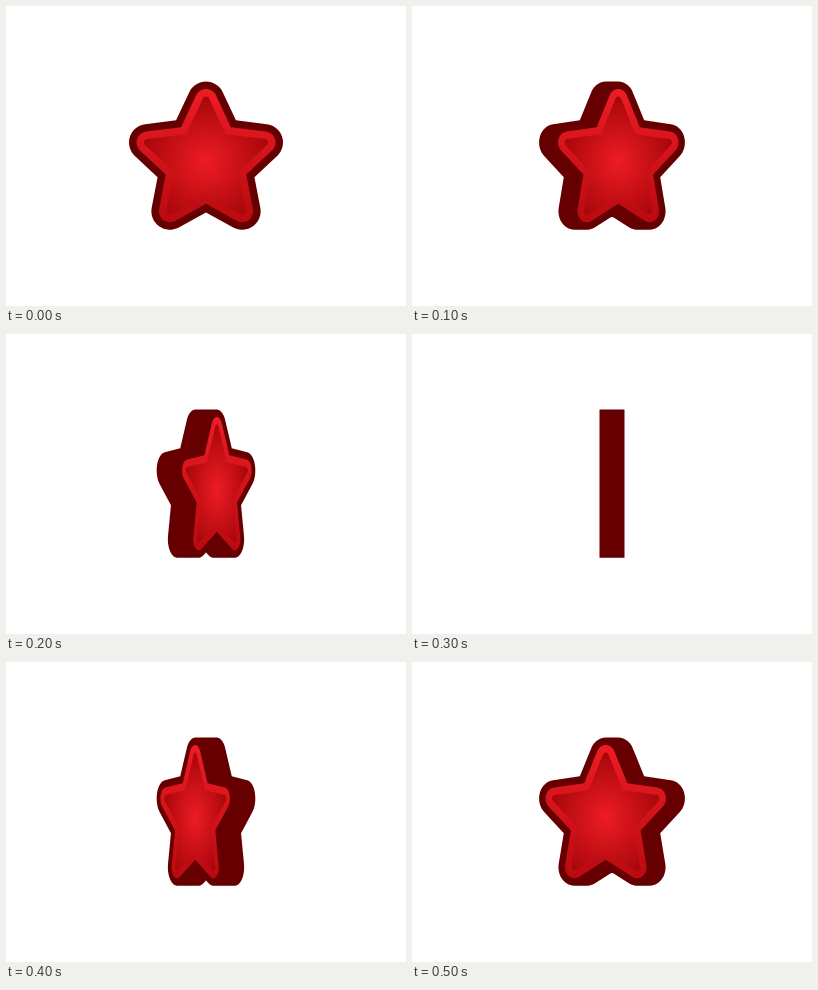
These frames come from a looping animation (400 px wide and 300 px high, 0.6 s). An HTML page with a canvas:

```html
<!DOCTYPE html>
<html lang="en">
<head>
<meta charset="utf-8">
<title>Spinning star</title>
<style>
html, body { margin: 0; width: 100%; height: 100%; overflow: hidden; background: #fff; }
canvas { display: block; }
</style>
</head>
<body>
<canvas id="stage" width="400" height="300"></canvas>
<script>
const ctx = document.getElementById('stage').getContext('2d');
const CX = 200, CY = 155.5;
const TIP = 61.5, NOTCH = 29.8;   // radii of the star's skeleton
const HALF_DEPTH = 12.5;
const STEP = 100, STEPS = 6;      // half a turn per loop, as both faces look alike
const STEP_ANGLE = Math.PI / STEPS;

// Star outline grown by r, with round tips and sharp notches, clockwise.
function outline(r) {
  const fifth = Math.PI / 5;
  const half = Math.atan2(NOTCH * Math.sin(fifth), TIP - NOTCH * Math.cos(fifth));
  const spread = Math.PI / 2 - half;
  const notch = NOTCH + r / Math.sin(half + fifth);
  const points = [];
  for (let k = 0; k < 5; k++) {
    const a = -Math.PI / 2 + 2 * k * fifth;
    for (let i = -8; i <= 8; i++) {
      const b = a + spread * i / 8;
      points.push([TIP * Math.cos(a) + r * Math.cos(b), TIP * Math.sin(a) + r * Math.sin(b)]);
    }
    points.push([notch * Math.cos(a + fifth), notch * Math.sin(a + fifth)]);
  }
  return points;
}

function trace(path, points) {
  points.forEach(([x, y], i) => i ? path.lineTo(x, y) : path.moveTo(x, y));
  path.closePath();
}

function shape(points) {
  const path = new Path2D();
  trace(path, points);
  return path;
}

const body = outline(18.5);
const band = shape(outline(11));
const face = shape(outline(3.5));

const bandFill = ctx.createLinearGradient(0, -72, 0, 61);
bandFill.addColorStop(0, '#ed1c24');
bandFill.addColorStop(1, '#b90a10');
const faceFill = ctx.createRadialGradient(0, 0, 0, 0, 0, 66);
faceFill.addColorStop(0, '#ed1c24');
faceFill.addColorStop(1, '#a6060a');

// Both ends of the solid and the strips swept by every edge, as one path.
function solid(width, depth) {
  const path = new Path2D();
  const points = body.map(([x, y]) => [x * width, y]);
  for (const side of [-depth, depth]) trace(path, points.map(([x, y]) => [x + side, y]));
  points.forEach((p, i) => {
    const q = points[(i + 1) % points.length];
    const [a, b] = p[1] < q[1] ? [p, q] : [q, p];
    trace(path, [[a[0] - depth, a[1]], [a[0] + depth, a[1]],
                 [b[0] + depth, b[1]], [b[0] - depth, b[1]]]);
  });
  return path;
}

function draw(angle) {
  const turn = Math.cos(angle), width = Math.abs(turn);
  const depth = HALF_DEPTH * Math.sin(angle);
  ctx.setTransform(1, 0, 0, 1, 0, 0);
  ctx.fillStyle = '#fff';
  ctx.fillRect(0, 0, 400, 300);
  ctx.translate(CX, CY);
  ctx.fillStyle = '#660000';
  ctx.fill(solid(width, depth));
  if (width < 0.001) return;
  ctx.translate(depth * Math.sign(turn), 0);
  ctx.scale(width, 1);
  ctx.fillStyle = bandFill;
  ctx.fill(band);
  ctx.fillStyle = faceFill;
  ctx.fill(face);
}

function tick() {
  draw(Math.floor(performance.now() / STEP) % STEPS * STEP_ANGLE);
  requestAnimationFrame(tick);
}
tick();
</script>
</body>
</html>
```
